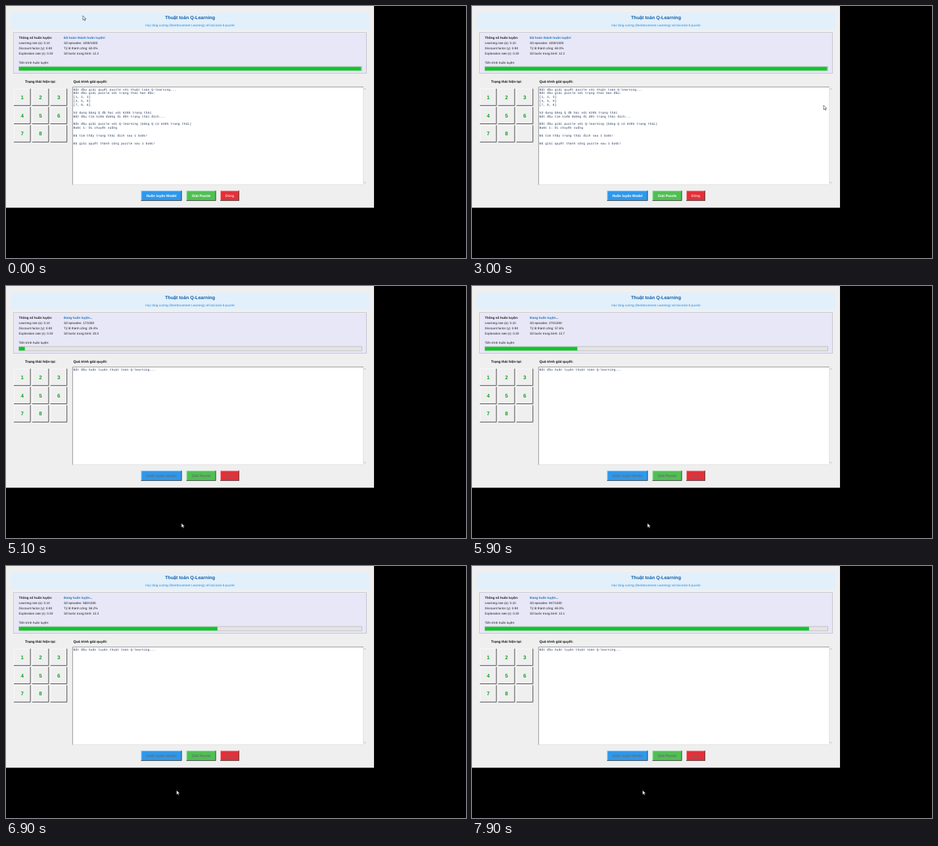
Write an HTML page that moves like this. It is 700 px wide and 384 px high and loops after 8 s.

```html
<!DOCTYPE html>
<html lang="vi">
<head>
<meta charset="utf-8">
<title>Thuật toán Q-Learning</title>
<style>
  html, body { margin: 0; width: 100%; height: 100%; overflow: hidden; background: #000; }
  svg { display: block; width: 700px; height: 384px; }
  text {
    font: 4.77px "Liberation Sans", Arial, sans-serif;
    fill: #1c1c1c;
    text-rendering: geometricPrecision;
    white-space: pre;
  }
  .mid { text-anchor: middle; }
  .title { font-size: 7.1px; font-weight: bold; fill: #0d5ca6; }
  .sub { fill: #2583cb; }
  .head { font-size: 4.9px; font-weight: bold; }
  .status { fill: #1e73b8; }
  .section { font-size: 5.3px; font-weight: bold; fill: #111; }
  .digit { font-size: 8px; font-weight: bold; fill: #08a818; }
  .log text { font: 4.845px "Liberation Mono", "Courier New", monospace; fill: #2a3a5c; }
  .caption { font-size: 5.4px; fill: #fff; }
  .bold { font-weight: bold; }
  .training .caption { fill: #666d70; }
</style>
</head>
<body>
<svg id="stage" viewBox="0 0 700 384">
  <rect width="700" height="384"/>
  <rect width="560" height="307.4" fill="#efefef"/>

  <rect x="7" y="10" width="546" height="25" fill="#e2f0fb"/>
  <text class="title mid" x="280" y="20.4">Thuật toán Q-Learning</text>
  <text class="sub mid" x="280" y="31.4">Học tăng cường (Reinforcement Learning) với bài toán 8-puzzle</text>

  <rect x="11.5" y="40.5" width="537" height="62" fill="#e8e7f7" stroke="#c4c4d0"/>
  <path d="M12.5 102V41.5H548" fill="none" stroke="#f6f6fd" stroke-width=".6"/>
  <text class="head" x="19.5" y="49.6">Thông số huấn luyện:</text>
  <text x="19.5" y="57.9">Learning rate (α): 0.10</text>
  <text x="19.5" y="65.6">Discount factor (γ): 0.90</text>
  <text x="19.5" y="73.6">Exploration rate (ε): 0.30</text>
  <text class="head status" id="status" x="88" y="49.6"></text>
  <text id="episodes" x="88" y="57.9"></text>
  <text id="success" x="88" y="65.6"></text>
  <text id="steps" x="88" y="73.6"></text>
  <text x="19.5" y="87.6">Tiến trình huấn luyện:</text>
  <rect x="19.5" y="92.2" width="522" height="6.6" fill="#e4e4e4" stroke="#bdbdbd" stroke-width=".9"/>
  <rect id="bar" x="19.8" y="92.7" height="5.6" fill="#10c72a"/>

  <text class="section mid" x="52.5" y="116.9">Trạng thái hiện tại:</text>
  <text class="section" x="102.5" y="116.9">Quá trình giải quyết:</text>
  <g id="tiles"></g>

  <rect x="101" y="123" width="443" height="149.5" fill="#fff"/>
  <path d="M101.4 272.5V123.4H544" fill="none" stroke="#8c8c8c" stroke-width=".9"/>
  <path d="M101.4 272.2H543.7V123.4" fill="none" stroke="#d5d5d5" stroke-width=".7"/>
  <path d="M544.7 127.3l1.3-1.5 1.3 1.5M544.7 268.5l1.3 1.5 1.3-1.5" fill="none" stroke="#a3a3a3" stroke-width=".7"/>
  <g class="log" id="done"></g>
  <g class="log" id="started"></g>
  <g id="buttons"></g>

  <path id="cursor" d="M0 0V6.6L1.6 5.2 2.7 7.5 3.8 7 2.7 4.8H4.8Z" fill="#fff" stroke="#222" stroke-width=".6"/>
</svg>
<script>
const LOOP = 8000, STEP = 100, TRAIN_AT = 5000;
const $ = id => document.getElementById(id);

function add(parent, tag, attrs, text) {
  const el = document.createElementNS("http://www.w3.org/2000/svg", tag);
  for (const key in attrs) el.setAttribute(key, attrs[key]);
  if (text) el.textContent = text;
  parent.append(el);
}

function bevel(parent, x, y, w, h, fill) {
  add(parent, "rect", { x, y, width: w, height: h, fill });
  add(parent, "path", { d: `M${x + .4} ${y + h}V${y + .4}H${x + w}`, fill: "none", stroke: "#fff", "stroke-opacity": .75, "stroke-width": .8 });
  add(parent, "path", { d: `M${x} ${y + h - .5}H${x + w - .5}V${y}`, fill: "none", stroke: "#4c4c4c", "stroke-width": 1 });
}

for (let i = 0; i < 9; i++) {
  const x = 12 + i % 3 * 27.8, y = 126 + Math.floor(i / 3) * 27.8;
  bevel($("tiles"), x, y, 25.6, 26.2, "#efefef");
  if (i < 8) add($("tiles"), "text", { class: "digit mid", x: x + 12.7, y: y + 15.8 }, String(i + 1));
}

function button(x, w, fill, label, weight) {
  bevel($("buttons"), x, 281.3, w, 15.7, fill);
  add($("buttons"), "text", { class: `caption mid ${weight}`, x: x + w / 2, y: 290.9 }, label);
}
button(205.5, 62, "#2c99ee", "Huấn luyện Model", "bold");
button(274.5, 45, "#4fc052", "Giải Puzzle", "bold");
button(326, 29, "#e52f38", "Đóng", "");

function writeLog(id, lines) {
  lines.forEach((line, i) => add($(id), "text", { x: 102.5, y: 128.6 + i * 5.86 }, line));
}
writeLog("started", ["Bắt đầu huấn luyện thuật toán Q-learning..."]);
writeLog("done", [
  "Bắt đầu giải quyết puzzle với thuật toán Q-learning...",
  "Bắt đầu giải puzzle với trạng thái ban đầu:",
  "[1, 2, 3]",
  "[4, 5, 0]",
  "[7, 8, 6]",
  "",
  "Sử dụng bảng Q đã học với 6285 trạng thái",
  "Bắt đầu tìm kiếm đường đi đến trạng thái đích...",
  "",
  "Bắt đầu giải puzzle với Q-learning (bảng Q có 6285 trạng thái)",
  "Bước 1: Di chuyển xuống",
  "",
  "Đã tìm thấy trạng thái đích sau 1 bước!",
  "",
  "Đã giải quyết thành công puzzle sau 1 bước!"
]);

// Each row: time, then the values reached at that time.
const cursorPath = [
  [0, 117, 14.8], [400, 300, 280], [800, 528.8, 142.5], [1500, 529, 142.5],
  [1800, 535, 151.3], [3100, 535, 151.3], [3200, 291, 360], [3300, 291, 360],
  [3500, 287, 360.5], [4400, 287, 360.5], [4500, 267.2, 352.3],
  [4800, 267.2, 363], [5000, 267, 361.5], [6200, 267, 361.5], [6500, 259.5, 341.8]
];
// Columns: time, episodes, success rate, average steps.
const training = [
  [5000, 0, 0, 0], [5100, 17, 29.4, 20], [5300, 80, 52.5, 15.2], [5900, 270, 57.6, 13.7],
  [6900, 580, 58.2, 13.3], [7100, 653, 58.7, 13.3], [7900, 947, 60, 13.1]
];
const finished = [1000, 60, 12.2];

function at(rows, t) {
  const next = rows.findIndex(row => row[0] > t);
  if (next < 0) return rows[rows.length - 1].slice(1);
  const a = rows[next - 1], b = rows[next];
  const k = (t - a[0]) / (b[0] - a[0]);
  return a.slice(1).map((v, i) => v + (b[i + 1] - v) * k);
}

function draw(t) {
  const busy = t >= TRAIN_AT;
  const [episodes, success, steps] = busy ? at(training, t) : finished;
  const [x, y] = at(cursorPath, t);
  $("stage").classList.toggle("training", busy);
  $("done").style.display = busy ? "none" : "";
  $("started").style.display = busy ? "" : "none";
  $("status").textContent = busy ? "Đang huấn luyện..." : "Đã hoàn thành huấn luyện!";
  $("episodes").textContent = `Số episodes: ${Math.round(episodes)}/1000`;
  $("success").textContent = `Tỷ lệ thành công: ${success.toFixed(1)}%`;
  $("steps").textContent = `Số bước trung bình: ${steps.toFixed(1)}`;
  $("bar").setAttribute("width", episodes * .5207);
  $("cursor").setAttribute("transform", `translate(${x} ${y})`);
}

const start = performance.now();
function tick() {
  const t = (performance.now() - start) % LOOP;
  draw(Math.floor(t / STEP) * STEP);
  requestAnimationFrame(tick);
}
tick();
</script>
</body>
</html>
```
